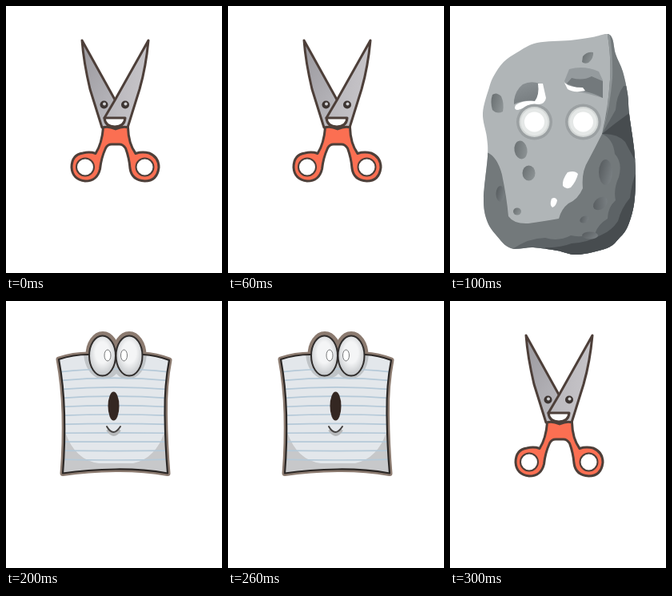
Animation of 270x334 px, one loop 0.4 s. Source, as an HTML page:

```html
<!DOCTYPE html>
<html lang="en">
<head>
<meta charset="utf-8">
<title>Rock, paper, scissors</title>
<style>
html, body { margin: 0; width: 100%; height: 100%; overflow: hidden; background: #fff; }
svg { display: block; width: 100vw; height: 100vh; }
</style>
</head>
<body>
<svg viewBox="0 0 270 334">
  <defs>
    <linearGradient id="steel" x2=".6" y2="1">
      <stop offset="0" stop-color="#99979c"/><stop offset="1" stop-color="#b9b8bd"/>
    </linearGradient>
    <linearGradient id="shine" x2="1" y2=".3">
      <stop offset="0" stop-color="#b5b3b8"/><stop offset="1" stop-color="#c6c4c8"/>
    </linearGradient>
    <linearGradient id="pit" x2="1" y2=".5">
      <stop offset="0" stop-color="#676d6f"/><stop offset="1" stop-color="#8b9193"/>
    </linearGradient>
    <linearGradient id="deepPit" x2="1" y2=".5">
      <stop offset="0" stop-color="#54595c"/><stop offset="1" stop-color="#777d80"/>
    </linearGradient>
    <linearGradient id="brow" x2=".4" y2="1">
      <stop offset="0" stop-color="#8d9396"/><stop offset="1" stop-color="#777d80"/>
    </linearGradient>
    <radialGradient id="ball" cx=".5" cy=".42" r=".58">
      <stop offset=".45" stop-color="#f4f5f6"/><stop offset="1" stop-color="#c3c6c9"/>
    </radialGradient>
    <path id="rockShape"/>
    <path id="sheetShape" d="M66 73Q84 67 103 67H171Q188 68 204 74Q198 105 198.500 141Q199 181 202 215.500Q170 210 137 210.500Q102 211 71 215.500Q74 178 73 141Q72 105 66 73Z"/>
    <clipPath id="rockClip"><use href="#rockShape"/></clipPath>
    <clipPath id="sheetClip"><use href="#sheetShape"/></clipPath>
  </defs>

  <g id="scissors" stroke="#4d3f39" stroke-width="3" stroke-linejoin="round">
    <path fill="url(#steel)" d="M95 43Q97 70 105 104L120 152H134L143 128L136 117Z"/>
    <path fill="url(#shine)" d="M178 43Q175 76 167 104L152 152H129L123 140L136 118Z"/>
    <path fill="#fb6f52" d="M121.500 152Q128 150 137 154Q146 150 152.500 152Q153 172 162 184.500Q170 182 179 184Q191 189 191 202Q189 219 173.500 219Q157 218 155 203Q154 190 149.500 178Q146 172.500 141 173H132Q127 173 124.500 178Q119 190 117.500 204Q114 219 99 219Q83 217 82 202Q82 186 96 184Q105 182 112 184.500Q120 172 121.500 152Z"/>
    <circle cx="99" cy="201.500" r="11" fill="#fff" stroke-width="2"/>
    <circle cx="173.500" cy="201.500" r="11" fill="#fff" stroke-width="2"/>
    <path fill="#fff" d="M123 140H149Q148 151 136 151Q124 151 123 140Z"/>
    <g stroke="none">
      <circle cx="122.500" cy="123.500" r="5" fill="#3d3532"/><circle cx="149" cy="123.500" r="5" fill="#3d3532"/>
      <circle cx="123" cy="122.500" r="2" fill="#d0d0d2"/><circle cx="149.500" cy="122.500" r="2" fill="#d0d0d2"/>
    </g>
  </g>

  <g id="rock">
    <use href="#rockShape" fill="#b0b5b7"/>
    <g clip-path="url(#rockClip)">
      <path fill="#73797b" d="M196 30Q202 65 200 92Q198 126 190 160Q181 178 173 193Q164 207 166 228Q160 242 148 247Q139 254 136 266Q119 269 98 272Q80 273 73 263Q71 240 65 211Q59 188 46 183L35 320H245V30Z"/>
      <path fill="#8e9496" d="M196 30Q202 65 200 92L196 135L191 158Q200 126 203 90Q204 62 199 30Z"/>
      <path fill="#5d6366" d="M217 100Q208 112 207 130L190 160Q204 166 206 185Q216 196 211 214Q204 229 207 243Q197 252 197 266Q185 273 181 285Q163 290 151 287Q136 295 119 290Q99 290 78 304L130 320H245V100Z"/>
      <path fill="#474c4f" d="M224 134Q207 146 190 160Q209 159 219 170Q224 180 232 194L245 150Z"/>
      <path fill="#474c4f" d="M234 205Q227 220 225 240Q214 253 210 269Q202 281 190 286Q172 296 152 297Q136 303 119 302L130 325H245V205Z"/>
    </g>
    <g fill="url(#pit)">
      <path d="M53 111Q58 107 64 113Q68 122 66 132Q59 136 53 130Q50 120 53 111Z"/>
      <ellipse cx="88.500" cy="180" rx="8" ry="11.500" transform="rotate(-10 88.500 180)"/>
      <ellipse cx="98.500" cy="209" rx="8" ry="9.500"/>
      <path d="M166 63Q171 57 179 58Q180 65 173 71Q168 73 165 70Z"/>
      <ellipse cx="84" cy="257" rx="5" ry="4.500"/>
    </g>
    <g fill="url(#deepPit)">
      <ellipse cx="194.500" cy="208" rx="8.500" ry="16"/>
      <ellipse cx="188" cy="247" rx="10" ry="7" transform="rotate(-38 188 247)"/>
      <ellipse cx="168" cy="267" rx="6" ry="4" transform="rotate(-25 168 267)"/>
      <ellipse cx="63" cy="235" rx="5.500" ry="10"/>
      <ellipse cx="175" cy="287" rx="10" ry="4.500"/>
    </g>
    <path fill="url(#brow)" d="M80 118Q82 105 91 98Q101 93 112 97L113 106L107 119Q91 117 80 123Z"/>
    <path fill="#fff" d="M110 97L116 97L120 115Q119 122 111 123Q98 125 85 130Q79 130 82 124Q90 118 106 119Q112 111 110 97Z"/>
    <path fill="#959b9e" d="M143 94L149 79Q168 74 186 82L191 93V115Q171 109 151 105Z"/>
    <path fill="#73797c" d="M146 97L152 90Q166 94 177 88L191 94V115Q180 109 169 107Q158 102 146 97Z"/>
    <path fill="#fff" d="M143 96Q150 102 166 102L169 106Q154 109 147 104Z"/>
    <g id="rockEyes"></g>
    <path fill="#fff" d="M147 208Q156 205 160 210Q158 219 151 227Q145 230 141 225Q140 217 147 208ZM127 241Q132 238 134 243Q133 250 128 252Q124 249 127 241Z"/>
  </g>

  <g id="paper">
    <g fill="#8c7b70" stroke="#8c7b70" stroke-width="7" stroke-linejoin="round">
      <use href="#sheetShape"/>
      <ellipse cx="121" cy="68" rx="18" ry="26.500"/><ellipse cx="154" cy="68" rx="18" ry="26.500"/>
    </g>
    <use href="#sheetShape" fill="#e3e7eb"/>
    <g clip-path="url(#sheetClip)">
      <path fill="#c7c8ca" d="M60 150L74 164Q86 199 116 203H159Q187 197 198 164L210 150V225H60Z"/>
      <path fill="#c0c4c7" d="M97 66H176Q174 96 152 98Q143 97 138 91Q131 99 116 97Q99 90 97 66Z"/>
      <g id="rules" fill="none" stroke="#b5c9d8" stroke-width="1.700"></g>
    </g>
    <use href="#sheetShape" fill="none" stroke="#2b2725" stroke-width="2.200" stroke-linejoin="round"/>
    <g fill="url(#ball)" stroke="#302d2c" stroke-width="2">
      <ellipse cx="120.500" cy="68.500" rx="16.500" ry="25"/><ellipse cx="154" cy="68.500" rx="16.500" ry="25"/>
    </g>
    <g fill="#fff" stroke="#77797a" stroke-width="1">
      <ellipse cx="127" cy="68" rx="4" ry="7"/><ellipse cx="147.500" cy="68" rx="4" ry="7"/>
    </g>
    <ellipse cx="134.500" cy="131.500" rx="7" ry="18" fill="#342722"/>
    <path d="M127 161Q135 173 142 161" fill="none" stroke="#b6b8ba" stroke-width="4"/>
    <path d="M126 157Q134 171 143 157" fill="none" stroke="#454241" stroke-width="2" stroke-linecap="round"/>
  </g>
</svg>
<script>
const byId = id => document.getElementById(id);
const names = ["scissors", "rock", "paper", "scissors"];
const layers = ["scissors", "rock", "paper"].map(byId);
const STEP = 100;

// Closed smooth curve through the given points.
function smooth(text) {
  const pts = text.split(" ").map(p => p.split(",").map(Number));
  const at = i => pts[(i + pts.length) % pts.length];
  const handle = (i, side) => at(i).map((v, k) => v + side * (at(i + 1)[k] - at(i - 1)[k]) / 6);
  return `M${at(0)}` + pts.map((_, i) => `C${handle(i, 1)} ${handle(i + 1, -1)} ${at(i + 1)}`).join("") + "Z";
}
byId("rockShape").setAttribute("d", smooth(
  "196,35 203,41 207,60 216,82 222,110 224,135 230,178 232,212 230,248 222,276 211,291 196,303 " +
  "159,311 134,306 104,302 76,303 58,287 46,268 42,240 47,188 46,164 41,134 49,102 55,87 67,70 84,58 109,46 150,43 178,39"));

const ring = (x, y) => [[22.5, "#9ba0a2"], [19, "#d3d7d6"], [17, "#e5e8e7"], [12.5, "#fff"]]
  .map(([r, fill]) => `<circle cx="${x}" cy="${y}" r="${r}" fill="${fill}"/>`).join("");
byId("rockEyes").innerHTML = ring(105.5, 145) + ring(166.5, 145);

byId("rules").innerHTML = Array.from({ length: 11 }, (_, i) => {
  const y = 85 + i * 11.4, bow = 4 - i * .5;
  return `<path d="M64 ${y + bow}Q136 ${y - bow} 206 ${y + bow}"/>`;
}).join("");

function draw(time) {
  const shown = names[Math.floor(time / STEP) % names.length];
  for (const layer of layers) layer.style.display = layer.id === shown ? "" : "none";
}

const start = performance.now();
function tick() {
  draw(performance.now() - start);
  requestAnimationFrame(tick);
}
tick();
</script>
</body>
</html>
```
